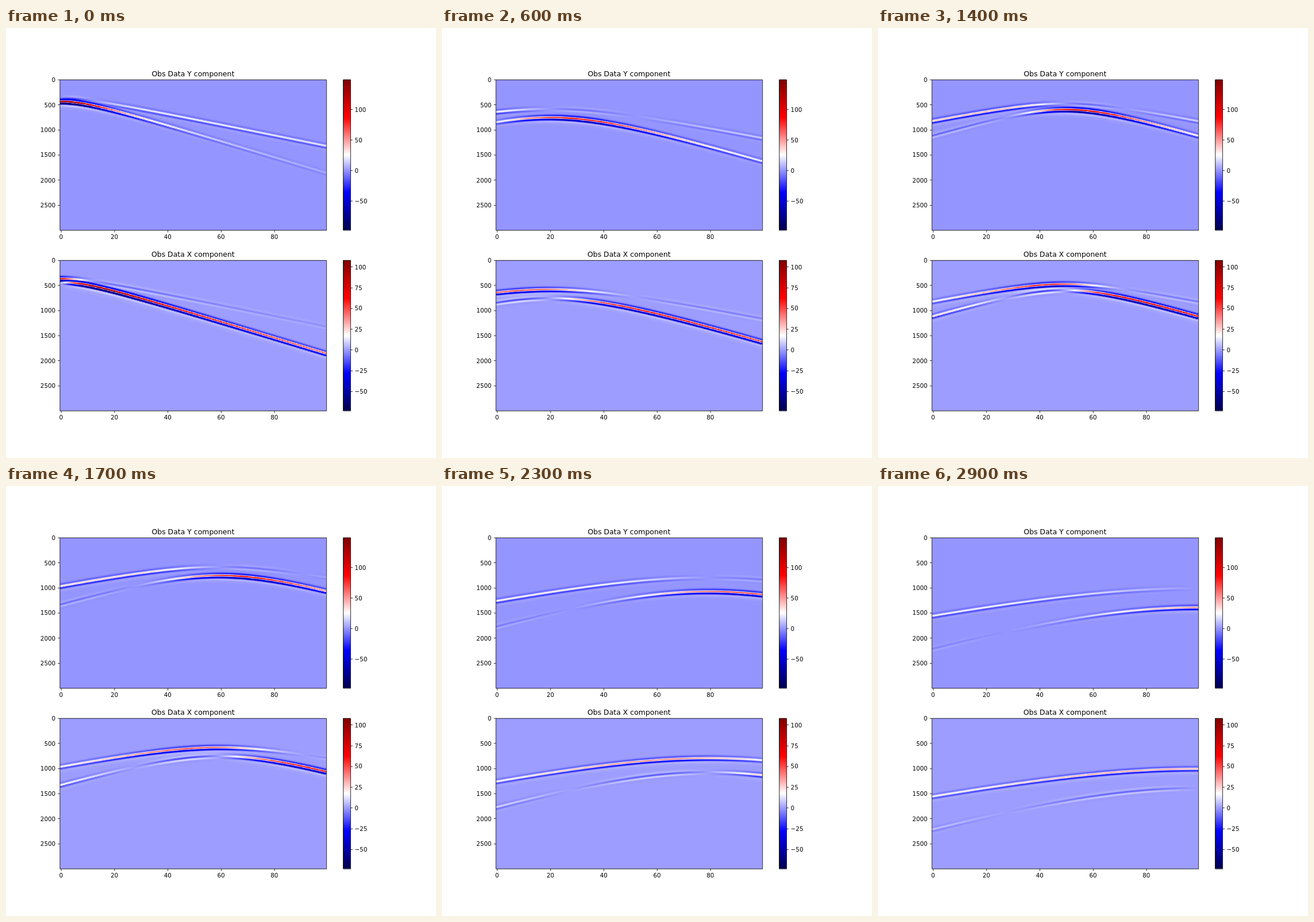
An HTML page with a canvas that plays this animation: 748 px wide and 748 px high, repeating every 3000 ms.

```html
<!DOCTYPE html>
<html lang="en">
<head>
<meta charset="utf-8">
<title>Seismic shot gathers</title>
<style>
  html, body { margin: 0; width: 100%; height: 100%; overflow: hidden; background: #fff; }
  canvas, svg { position: absolute; left: 0; top: 0; width: 748px; height: 748px; }
  text { font: 13.89px "DejaVu Sans", sans-serif; fill: #000; }
  .title { font-size: 16.67px; text-anchor: middle; }
  .mid { text-anchor: middle; }
  .end { text-anchor: end; }
  .line { fill: none; stroke: #000; stroke-width: 1.11; }
</style>
</head>
<body>
<canvas id="stage" width="748" height="748"></canvas>
<svg id="axes" viewBox="0 0 1000 1000">
  <defs>
    <linearGradient id="seismic" x1="0" y1="1" x2="0" y2="0">
      <stop offset="0" stop-color="#00004d"/>
      <stop offset=".25" stop-color="#00f"/>
      <stop offset=".5" stop-color="#fff"/>
      <stop offset=".75" stop-color="#f00"/>
      <stop offset="1" stop-color="#800000"/>
    </linearGradient>
  </defs>
</svg>
<script>
// Layout is in a 1000-unit figure, shown at 748 px.
const LEFT = 125, WIDTH = 620, HEIGHT = 350, BAR = 783.75, BAR_W = 17.5;
const COLS = 100, SAMPLES = 3000, COL_W = WIDTH / COLS;
const STEP = 100, STEPS = 30, SHOTS = 110;

const panels = [
  { title: 'Obs Data Y component', top: 120, min: -97.6, max: 148.7, ticks: [-50, 0, 50, 100] },
  { title: 'Obs Data X component', top: 540, min: -73.4, max: 108, ticks: [-50, -25, 0, 25, 50, 75, 100] }
];

// Static axes, colour bars and labels
const svg = document.getElementById('axes');
function add(tag, attrs, text) {
  const el = document.createElementNS('http://www.w3.org/2000/svg', tag);
  for (const key in attrs) el.setAttribute(key, attrs[key]);
  if (text !== undefined) el.textContent = text;
  svg.appendChild(el);
}
const snap = v => Math.round(v) + 0.5;
const line = d => add('path', { class: 'line', d });
const label = (x, y, text, cls) =>
  add('text', { x, y: Math.round(y), class: cls }, String(text).replace('-', '\u2212'));
function box(x, y, w, h) {
  line(`M${snap(x)} ${snap(y)}H${snap(x + w)}V${snap(y + h)}H${snap(x)}Z`);
}

for (const { title, top, min, max, ticks } of panels) {
  const bottom = top + HEIGHT;
  label(LEFT + WIDTH / 2, top - 8.33, title, 'title');
  for (let v = 0; v < COLS; v += 20) {
    const x = LEFT + (v + 0.5) * COL_W;
    line(`M${snap(x)} ${bottom + 0.5}v4.86`);
    label(x, bottom + 20.6, v, 'mid');
  }
  for (let v = 0; v < SAMPLES; v += 500) {
    const y = top + (v + 0.5) * HEIGHT / SAMPLES;
    line(`M${LEFT + 0.5} ${snap(y)}h-4.86`);
    label(LEFT - 9.72, y + 5.4, v, 'end');
  }
  add('rect', { x: BAR, y: top, width: BAR_W, height: HEIGHT, fill: 'url(#seismic)' });
  for (const v of ticks) {
    const y = bottom - (v - min) / (max - min) * HEIGHT;
    line(`M${BAR + BAR_W} ${snap(y)}h4.86`);
    label(BAR + BAR_W + 9.72, y + 5.4, v, '');
  }
  box(LEFT, top, WIDTH, HEIGHT);
  box(BAR, top, BAR_W, HEIGHT);
}

// Colour table
const palette = new Uint32Array(256);
for (let i = 0; i < 256; i++) {
  const f = i / 255 * 4;
  const ramp = (a, b, t) => Math.round(255 * (a + (b - a) * t));
  const [r, g, b] =
    f < 1 ? [0, 0, ramp(0.3, 1, f)] :
    f < 2 ? [ramp(0, 1, f - 1), ramp(0, 1, f - 1), 255] :
    f < 3 ? [255, ramp(1, 0, f - 2), ramp(1, 0, f - 2)] :
            [ramp(1, 0.5, f - 3), 0, 0];
  palette[i] = (255 << 24 | b << 16 | g << 8 | r) >>> 0;
}

// Half-derivative of a Ricker pulse, as a line source sends it out in 2D
const REACH = 180, PEAK_FREQ = 0.06;
const pulse = new Float32Array(2 * REACH + 2);
let peak = 0;
for (let i = 0; i < pulse.length; i++) {
  const tau = (i - REACH) * PEAK_FREQ;
  for (let w = 0.02; w < 4.5; w += 0.04) {
    pulse[i] += w ** 2.5 * Math.exp(-w * w) * Math.cos(w * tau + Math.PI / 4);
  }
  peak = Math.max(peak, pulse[i]);
}
for (let i = 0; i < pulse.length; i++) pulse[i] /= peak;

const DELAY = 243.5;
const P = { slow: 10.85, gain: 264 };
const S = { slow: 16.22, gain: 480 };
const ROW = SAMPLES / HEIGHT;

function addArrival(field, col, wave, dist, weight) {
  const centre = DELAY + wave.slow * dist;
  const amp = wave.gain * weight / Math.sqrt(dist);
  const first = Math.max(0, Math.ceil((centre - REACH) / ROW - 0.5));
  const last = Math.min(HEIGHT - 1, Math.floor((centre + REACH) / ROW - 0.5));
  for (let row = first; row <= last; row++) {
    const pos = (row + 0.5) * ROW - centre + REACH;
    const i = Math.floor(pos);
    field[row * COLS + col] += amp * (pulse[i] + (pulse[i + 1] - pulse[i]) * (pos - i));
  }
}

// Receivers on the surface, diagonal point force at (x, depth)
function gather(x, depth) {
  const fields = panels.map(() => new Float32Array(COLS * HEIGHT));
  for (let col = 0; col < COLS; col++) {
    const dist = Math.hypot(col - x, depth);
    const s = (col - x) / dist, u = depth / dist;
    addArrival(fields[0], col, P, dist, s * s - s * u);
    addArrival(fields[0], col, S, dist, u * u + s * u);
    addArrival(fields[1], col, P, dist, u * u - s * u);
    addArrival(fields[1], col, S, dist, s * s + s * u);
  }
  return fields;
}

// Smooth blending between neighbouring columns
const blend = Array.from({ length: WIDTH }, (_, px) => {
  const u = Math.min(COLS - 1, Math.max(0, (px + 0.5) / COL_W - 0.5));
  const a = Math.floor(u);
  return { a, b: Math.min(COLS - 1, a + 1), k: 0.5 - 0.5 * Math.cos(Math.PI * (u - a)) };
});

const ctx = document.getElementById('stage').getContext('2d');
ctx.scale(0.748, 0.748);
ctx.imageSmoothingQuality = 'high';
const plot = document.createElement('canvas');
plot.width = WIDTH;
plot.height = HEIGHT;
const plotCtx = plot.getContext('2d');
const image = plotCtx.createImageData(WIDTH, HEIGHT);
const pixels = new Uint32Array(image.data.buffer);

function drawField(field, { top, min, max }) {
  const scale = 256 / (max - min);
  for (let row = 0, i = 0; row < HEIGHT; row++) {
    const base = row * COLS;
    for (const { a, b, k } of blend) {
      const v = field[base + a] * (1 - k) + field[base + b] * k;
      pixels[i++] = palette[Math.max(0, Math.min(255, Math.floor((v - min) * scale)))];
    }
  }
  plotCtx.putImageData(image, 0, 0);
  ctx.drawImage(plot, LEFT, top);
}

// Shots run down each column of source positions, then on to the next column
let shown = -1;
function tick() {
  const step = Math.floor(performance.now() / STEP) % STEPS;
  if (step !== shown) {
    shown = step;
    const shot = Math.floor(step * SHOTS / STEPS);
    const fields = gather(9.9 * Math.floor(shot / 10), 12.5 + 9.82 * (shot % 10));
    panels.forEach((panel, i) => drawField(fields[i], panel));
  }
  requestAnimationFrame(tick);
}
tick();
</script>
</body>
</html>
```
